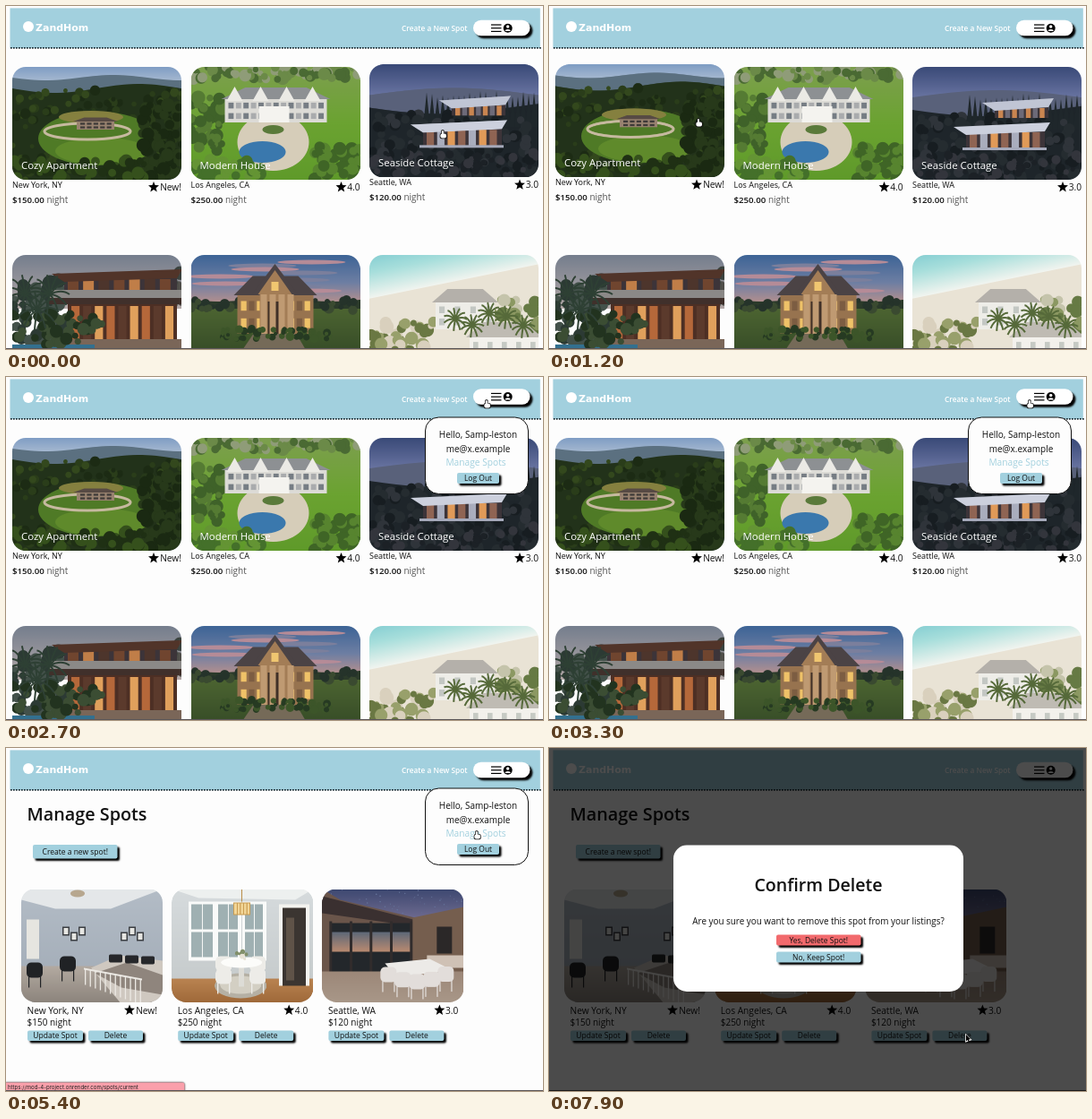
Animation of 600 by 383 pixels, one loop 8 s. Source, as an HTML page with a canvas:

```html
<!DOCTYPE html>
<html lang="en">
<head>
<meta charset="utf-8">
<title>Rental spots</title>
<style>
html, body { margin: 0; width: 100%; height: 100%; overflow: hidden; background: #fdfdfd; }
canvas { display: block; width: 600px; height: 383px; }
</style>
</head>
<body>
<canvas id="stage" width="600" height="383"></canvas>
<script>
const W = 600, H = 383, LOOP = 8000;
const BLUE = '#a2d0de', INK = '#111';
const screen = document.getElementById('stage').getContext('2d');
let g = screen;

// ---- drawing helpers ----
let seed = 7;
const rnd = () => (seed = (seed * 16807) % 2147483647) / 2147483647;

function rect(c, x, y, w, h) { g.fillStyle = c; g.fillRect(x, y, w, h); }
function round(c, x, y, w, h, r) {
  g.beginPath(); g.roundRect(x, y, w, h, r); g.fillStyle = c; g.fill();
}
function oval(c, x, y, rx, ry = rx) {
  g.beginPath(); g.ellipse(x, y, rx, ry, 0, 0, 7); g.fillStyle = c; g.fill();
}
function ring(c, w, x, y, rx, ry) {
  g.beginPath(); g.ellipse(x, y, rx, ry, 0, 0, 7);
  g.strokeStyle = c; g.lineWidth = w; g.stroke();
}
function poly(c, ...p) {
  g.beginPath();
  for (let i = 0; i < p.length; i += 2) g.lineTo(p[i], p[i + 1]);
  g.closePath(); g.fillStyle = c; g.fill();
}
function repeat(n, fn) { for (let i = 0; i < n; i++) fn(i); }
function text(s, x, y, size, { weight = 500, color = INK, align = 'left', font = 'Open Sans' } = {}) {
  g.font = `${weight} ${size}px "${font}", sans-serif`;
  g.fillStyle = color; g.textAlign = align;
  g.fillText(s, x, y);
  return g.measureText(s).width;
}
function star(x, y, r) {
  const p = [];
  repeat(10, i => {
    const a = i * Math.PI / 5 - Math.PI / 2, q = i % 2 ? r * 0.43 : r;
    p.push(x + Math.cos(a) * q, y + Math.sin(a) * q);
  });
  poly('#000', ...p);
}
function shadowed(dx, blur, fn) {
  g.save();
  g.shadowColor = '#000'; g.shadowBlur = blur; g.shadowOffsetX = g.shadowOffsetY = dx;
  fn(); g.restore();
}
function button(label, x, y, w, h, color = BLUE) {
  shadowed(2.5, 2, () => round(color, x, y, w, h, 2));
  text(label, x + w / 2, y + h / 2 + 3, 8.5, { align: 'center' });
}

// ---- scenery helpers ----
function fade(y, h, ...cols) {
  const f = g.createLinearGradient(0, y, 0, y + h);
  cols.forEach((c, i) => f.addColorStop(i / (cols.length - 1), c));
  rect(f, -20, y, 240, h);
}
function hills(c, y, amp, wave) {
  g.beginPath(); g.moveTo(0, 126);
  for (let x = 0; x <= 190; x += 5) g.lineTo(x, y + amp * Math.sin(x / wave));
  g.lineTo(190, 126); g.fillStyle = c; g.fill();
}
function leaves(n, x, y, w, h, r, ...cols) {
  repeat(n, i => oval(cols[i % cols.length], x + rnd() * w, y + rnd() * h, r * (0.4 + rnd() * 0.6)));
}
function panes(n, x, y, w, h, ...cols) {
  repeat(n, i => rect(cols[i % cols.length], x + w * i / n, y, w / n * 0.7, h));
}
function house(x, y, w, h, wall, roof, ...lights) {
  rect(wall, x, y, w, h);
  poly(roof, x - 4, y, x + w * 0.2, y - h * 0.5, x + w * 0.8, y - h * 0.5, x + w + 4, y);
  repeat(2, i => panes(Math.round(w / 9), x + 4, y + h * (0.15 + i * 0.45), w - 5, h * 0.25, ...lights));
}
function slab(x, y, w, h, roof, ...lights) {
  rect('#3c3439', x, y, w, h);
  panes(7, x + 4, y + 3, w - 6, h - 3, ...lights);
  poly(roof, x - 14, y - 3, x + w + 6, y - 8, x + w, y + 2, x, y + 6);
}
function palm(x, y, r, c) {
  g.strokeStyle = c; g.lineWidth = 2;
  repeat(11, i => {
    const dx = Math.cos(i * 0.57) * r, dy = Math.sin(i * 0.57) * r;
    g.beginPath(); g.moveTo(x, y);
    g.quadraticCurveTo(x + dx * 0.6, y + dy * 0.6 - r * 0.3, x + dx, y + dy);
    g.stroke();
  });
}
function chair(c, x, y) {
  round(c, x - 9, y - 9, 18, 17, 5);
  [-7, 6].forEach(d => rect(c, x + d, y + 6, 1.2, 13));
}
function photo(w, h, paint) {
  const c = document.createElement('canvas'), k = 2;
  c.width = w * k; c.height = h * k;
  g = c.getContext('2d'); g.scale(k, k);
  g.beginPath(); g.roundRect(0, 0, w, h, 15); g.clip();
  paint(); g = screen;
  return { c, w, h };
}
const outside = paint => photo(189, 126, paint);
const room = paint => photo(158, 126, paint);
const show = (p, x, y) => g.drawImage(p.c, x, y, p.w, p.h);

// ---- photos ----
const valley = outside(() => {
  fade(0, 30, '#7f9dc4', '#c9d2dc');
  hills('#5b7080', 12, 3, 24);
  hills('#22321a', 24, 5, 30);
  leaves(200, 0, 26, 189, 100, 6, '#1c2b14', '#2a3d1a', '#33481d');
  oval('#4f7a26', 95, 80, 66, 30);
  oval('#5f8a2b', 100, 94, 52, 15);
  oval('#85803f', 88, 56, 36, 7);
  ring('#c6b99f', 3, 84, 72, 48, 9);
  house(72, 61, 42, 9, '#98826f', '#574a44', '#3e3a38');
  leaves(80, 145, 40, 44, 86, 8, '#1a2912', '#27391a');
  leaves(50, 0, 104, 150, 22, 8, '#1f3014', '#35501c');
});

const mansion = outside(() => {
  fade(0, 126, '#7d9f4e', '#6ba331', '#5f9a2a');
  leaves(70, 0, 0, 189, 14, 7, '#4a6a33', '#6b8a48', '#8f9c78');
  leaves(45, 0, 34, 36, 60, 8, '#3f6229', '#557b33');
  oval('#d6cdb9', 92, 84, 40, 32);
  house(38, 36, 114, 26, '#dcdbd6', '#8d9093', '#767d84', '#a9abad');
  repeat(4, i => poly('#ebeae5', 40 + i * 29, 38, 49 + i * 29, 22, 58 + i * 29, 38));
  rect('#f4f3ef', 76, 44, 34, 18);
  oval('#5a7a3a', 92, 70, 12, 5);
  oval('#3a78ad', 80, 95, 26, 12);
  leaves(50, 138, 88, 51, 38, 8, '#3f6526', '#57842f');
  leaves(40, 0, 104, 80, 22, 8, '#44702a', '#649434');
});

const cottage = outside(() => {
  fade(0, 70, '#3a4a78', '#6a75a2', '#a79fba');
  hills('#59617a', 34, 8, -60);
  hills('#1e252a', 48, 7, 50);
  repeat(22, i => poly('#1f272b', 60 + i * 6, 70, 64 + i * 6, 28 + 10 * rnd(), 68 + i * 6, 70));
  leaves(130, 0, 56, 189, 70, 7, '#171d21', '#252c30', '#2f343a');
  slab(92, 43, 60, 14, '#c0c5d4', '#c98550', '#6d6a78');
  slab(60, 70, 88, 20, '#ccd0dd', '#8f6453', '#a9adbd', '#e09a58');
  rect('#a5a9ba', 56, 90, 94, 3);
  leaves(60, 0, 98, 189, 28, 6, '#1c2126', '#33353c');
});

const villa = outside(() => {
  fade(0, 60, '#757e8d', '#b4a9a8');
  leaves(60, 0, 26, 60, 70, 9, '#2c3a34', '#43514a');
  leaves(20, 160, 20, 30, 40, 8, '#3a423e', '#504f4a');
  slab(58, 24, 126, 20, '#513429', '#70452f', '#c07e48', '#4d352c');
  rect('#8b8987', 42, 39, 147, 9);
  rect('#40302b', 40, 48, 149, 7);
  rect('#4d2f24', 62, 55, 122, 42);
  panes(9, 66, 57, 118, 38, '#b5683a', '#5b3a2c', '#e0a05c');
  rect('#7a6658', 44, 94, 145, 32);
  rect('#33708f', 0, 100, 92, 26);
  leaves(50, 0, 66, 100, 34, 8, '#22331f', '#3b4d33');
  repeat(3, i => palm(14 + i * 14, 44 + (i % 2) * 18, 22, '#2e4034'));
});

const manor = outside(() => {
  fade(0, 62, '#3d6496', '#6e7fa3', '#d09686');
  repeat(9, i => oval(i % 2 ? '#7b7f9c' : '#b58b97', rnd() * 189, 8 + i * 4, 38, 2.5));
  hills('#2b3a2a', 50, 2, 20);
  fade(60, 66, '#4c6431', '#2f4424');
  leaves(60, 0, 50, 189, 12, 6, '#25332a', '#3a4a30');
  poly('#756a58', 70, 88, 118, 88, 140, 126, 44, 126);
  house(52, 45, 85, 43, '#97734f', '#4b4345', '#efc268', '#7c5d42');
  poly('#4b4345', 68, 44, 94, 10, 120, 44);
  poly('#a37d56', 75, 44, 94, 17, 113, 44);
  rect('#a37d56', 77, 43, 35, 45);
  rect('#f0c670', 90, 30, 8, 10);
  rect('#403027', 86, 52, 18, 36);
  panes(4, 78, 44, 40, 44, '#bf9a72');
  leaves(60, 34, 82, 122, 12, 5, '#263a22', '#3c5529');
});

const beach = outside(() => {
  rect('#e9e3d5', 0, 0, 189, 126);
  g.save();
  g.translate(0, 12); g.rotate(-0.2);
  fade(-20, 56, '#78c8cf', '#a8dfdc', '#f2f5f0');
  g.restore();
  leaves(70, 0, 74, 75, 52, 8, '#6a7843', '#98a06b', '#d9d0bd');
  leaves(50, 130, 50, 59, 50, 8, '#667a44', '#8b9862', '#c5c4ab');
  house(74, 53, 66, 30, '#eeede8', '#b4b0aa', '#c3c7c3', '#eeede8');
  house(112, 92, 77, 34, '#f3f1ec', '#bfbbb3', '#c6cac4', '#f3f1ec');
  repeat(5, i => palm(96 + i * 19, 72 + 8 * Math.sin(i * 2), 13, '#566a3a'));
});

const bedroom = room(() => {
  fade(0, 126, '#b3bcc6', '#a0aab5');
  poly('#e4e7e9', 0, 0, 158, 0, 100, 22, 38, 22, 0, 12);
  oval('#b7a78f', 63, 5, 8, 4);
  rect('#e6e5e0', 6, 34, 14, 44);
  fade(86, 40, '#b3aaa1', '#8d857d');
  repeat(6, i => {
    const x = 46 + i * 9 + (i > 2 ? 38 : 0), y = 42 + (i % 2) * 6;
    rect('#3b3e42', x, y, 8, 10); rect('#e6e6e2', x + 1.5, y + 1.5, 5, 7);
  });
  poly('#cfc8c0', 78, 88, 110, 74, 158, 80, 158, 126, 110, 126);
  poly('#8f857d', 82, 94, 118, 82, 158, 96, 158, 118, 112, 110);
  repeat(3, i => round('#26272a', 98 + i * 18, 73 + i, 15, 9, 2));
  repeat(12, i => rect('#ece9e4', 71 + i * 5.6, 89 + i, 1.3, 18 + i));
  poly('#ece9e4', 70, 88, 135, 100, 135, 102, 70, 90);
  [15, 52].forEach((x, i) => chair('#202225', x, 91 - i * 7));
});

const dining = room(() => {
  fade(0, 126, '#d6dbdd', '#c3c8c9');
  poly('#edf0ef', 0, 0, 158, 0, 138, 12, 30, 10);
  fade(100, 26, '#b98351', '#a06a3a');
  repeat(3, i => {
    const x = 22 + i * 30, w = 25 - i * 2;
    rect('#f9faf9', x - 3, 14, w + 6, 66);
    repeat(4, k => rect('#9fb0b2', x + (k % 2) * w / 2, 17 + (k >> 1) * 31, w / 2 - 1, 28));
  });
  rect('#f3f3ef', 120, 17, 34, 91);
  rect('#3b3531', 124, 21, 26, 87);
  rect('#5f5348', 128, 32, 9, 70);
  rect('#b88a42', 77.5, 0, 1, 14);
  rect('#c99c51', 69, 15, 19, 14);
  panes(5, 70, 16, 18, 12, '#f2d698');
  oval('#b5b0a4', 77, 108, 29, 14);
  oval('#d3cfc3', 77, 107, 23, 10);
  repeat(4, i => chair('#edece8', 58 + (i % 2) * 38, 84 + (i >> 1) * 14));
  rect('#dddcd6', 75, 83, 6, 26);
  oval('#fcfcfa', 78, 82, 23, 6);
  leaves(8, 72, 70, 12, 9, 3, '#82906b', '#e8e3d6');
});

const patio = room(() => {
  fade(0, 45, '#3d4870', '#80779c');
  leaves(60, 0, 0, 158, 30, 0.8, '#65749b');
  poly('#6a554a', 0, 0, 20, 12, 112, 34, 112, 98, 0, 112);
  poly('#3a3030', 0, 8, 113, 37, 113, 43, 0, 27);
  poly('#755e4e', 101, 32, 158, 20, 158, 96, 101, 86);
  rect('#23272b', 8, 38, 91, 54);
  fade(48, 22, '#5d6878', '#b98a70');
  rect('#6a554a', 0, 48, 8, 22);
  rect('#755e4e', 101, 48, 57, 22);
  repeat(5, i => rect('#312c2c', 8 + i * 22.5, 36, 3, 56));
  rect('#2b2828', 128, 42, 17, 30);
  fade(92, 34, '#9c8778', '#a89788');
  rect('#cfc1b5', 117, 74, 41, 14);
  poly('#eceae7', 70, 83, 120, 78, 146, 91, 83, 98);
  repeat(5, i => chair('#e2ddda', 74 + i * 16, 96 + 8 * Math.sin(i * 0.8)));
});

const spots = [
  { title: 'Cozy Apartment', city: 'New York, NY', price: 150, rate: 'New!', out: valley, inside: bedroom, below: villa },
  { title: 'Modern House', city: 'Los Angeles, CA', price: 250, rate: '4.0', out: mansion, inside: dining, below: manor },
  { title: 'Seaside Cottage', city: 'Seattle, WA', price: 120, rate: '3.0', out: cottage, inside: patio, below: beach }
];

// ---- timeline (ms) ----
const OPEN = 2700, LINK = 3950, CLICK = 4250, READY = 4800, LEAVE = 5800, CLOSE = 6200, CONFIRM = 7600;
// Pointer rests: arrive, leave, x, y
const rests = [
  [0, 200, 487, 139], [1050, 1250, 166, 126], [1850, 2050, 525, 33],
  [2250, 3400, 536, 26], [3900, 5700, 525, 93], [6800, LOOP, 466, 320]
];
function pointer(t) {
  const i = rests.findIndex(r => t <= r[1]);
  const [arrive, , x, y] = rests[i];
  if (t >= arrive) return [x, y];
  const [, left, x0, y0] = rests[i - 1];
  const u = (t - left) / (arrive - left), e = u * u * (3 - 2 * u);
  return [x0 + (x - x0) * e, y0 + (y - y0) * e];
}
const cardX = i => 7 + i * 199.5;
const cardBox = i => [cardX(i), 68, 189, 152];
const pill = [522, 15.8, 63.5, 17.5];
const over = (t, [x, y, w, h]) => {
  const [px, py] = pointer(t);
  return px >= x && px <= x + w && py >= y && py <= y + h;
};
// Share of the last 120 ms spent hovering gives a linear transition.
function lift(t, box) {
  let n = 0;
  repeat(6, k => n += over(Math.max(0, t - k * 20), box));
  return -2.6 * n / 6;
}

// ---- page parts ----
function header(t) {
  rect(BLUE, 4.5, 2.4, 592.3, 44.6);
  for (let x = 5; x < 597; x += 3) rect('#182830', x, 46, 1.7, 1.7);
  oval('#fff', 25, 23, 6);
  text('ZandHom', 33, 28, 11, { weight: 700, color: '#fff', font: 'DejaVu Sans' });
  text('Create a New Spot', 515.5, 27.5, 8.3, { weight: 600, color: '#fff', align: 'right' });
  g.save();
  g.translate(0, t < CLICK ? lift(t, pill) : 0);
  shadowed(3, 2, () => round('#fff', ...pill, 9));
  repeat(3, i => rect('#000', 542, 20.4 + i * 3.7, 11.5, 1.2));
  oval('#000', 560.7, 24.7, 5);
  oval('#fff', 560.7, 23, 1.7);
  g.beginPath(); g.ellipse(560.7, 28, 3, 2.1, 0, Math.PI, 0); g.fill();
  g.restore();
}
function rating(s, x, y, size) {
  const w = text(s, x, y, size, { align: 'right' });
  star(x - Math.round(w) - 7, y - 3.7, 6.3);
}
function home(t) {
  spots.forEach((s, i) => {
    const x = cardX(i);
    show(s.below, x, 278);
    g.save();
    g.translate(x, lift(t, cardBox(i)));
    show(s.out, 0, 68);
    text(s.title, 10, 182, 11.4, { color: '#fff' });
    text(s.city, 0, 203, 9);
    rating(s.rate, 189, 206, 10.2);
    const w = text(`$${s.price}.00`, 0, 219.5, 9.7, { weight: 600 });
    text('night', w + 2.6, 219.5, 10, { color: '#555' });
    g.restore();
  });
}
function manage() {
  text('Manage Spots', 23.5, 81, 19.8, { weight: 600 });
  button('Create a new spot!', 30, 108, 94.5, 15.5);
  spots.forEach((s, i) => {
    g.save();
    g.translate(17 + i * 168.2, 0);
    show(s.inside, 0, 157.5);
    text(s.city, 6.5, 296.5, 10.2);
    rating(s.rate, 152, 296.5, 10.2);
    text(`$${s.price} night`, 6.5, 310, 10);
    button('Update Spot', 7, 315.5, 62, 11.5);
    button('Delete', 75, 315.5, 61, 11.5);
    g.restore();
  });
}
function menu() {
  round('#fdfdfd', 468.5, 45, 115, 85.5, 15);
  g.strokeStyle = INK; g.lineWidth = 1; g.stroke();
  text('Hello, Samp-leston', 527.5, 67.5, 10, { align: 'center' });
  text('me@x.example', 527.5, 84, 10, { align: 'center' });
  text('Manage Spots', 525, 98.5, 10.2, { align: 'center', color: BLUE });
  button('Log Out', 504, 107, 47, 12);
}
function status(label) {
  shadowed(0, 2, () => round('#faa0ab', -2, 373.5, 201.5, 12, 2.5));
  text(label, 2, 380.5, 6.1, { weight: 400, color: '#222', font: 'Inter' });
}
function confirmBox() {
  rect('rgba(0,0,0,0.7)', 0, 0, W, H);
  round('#fff', 139, 108.5, 324, 163.5, 15);
  text('Confirm Delete', 301, 160, 19.6, { weight: 600, align: 'center' });
  text('Are you sure you want to remove this spot from your listings?', 301, 196.5, 9.9, { align: 'center' });
  button('Yes, Delete Spot!', 254, 208.5, 94.5, 12, '#f26a6d');
  button('No, Keep Spot!', 254, 227.5, 94.5, 12);
}
function hand() {
  [[INK, 0.7], ['#fff', 0]].forEach(([c, d]) => {
    round(c, -d, -d, 1.8 + 2 * d, 6 + 2 * d, 1);
    round(c, -1.6 - d, 3.6 - d, 6.6 + 2 * d, 5 + 2 * d, 2);
  });
}
function arrow() {
  shadowed(0, 1.5, () => poly('#fff', -0.8, -1.6, -0.8, 8.8, 6.6, 6));
  poly('#000', 0, 0, 0, 7.4, 1.7, 5.9, 2.9, 8.6, 4.1, 8.1, 2.9, 5.4, 5.2, 5.3);
}
function cursor(t) {
  const hot = [pill, [491, 90, 68, 10], [428, 315, 61, 12]];
  if (t < CLICK) hot.push(...spots.map((s, i) => cardBox(i)));
  g.save();
  g.translate(...pointer(t));
  if (t < CONFIRM && hot.some(b => over(t, b))) hand(); else arrow();
  g.restore();
}

function draw(t) {
  rect('#fdfdfd', 0, 0, W, H);
  if (t < CLICK) home(t);
  else if (t < READY) text('Loading...', 4, 57.5, 10);
  else manage();
  header(t);
  if (t >= OPEN && t < CLOSE) menu();
  if (t >= LINK && t < LEAVE) {
    const waiting = t >= CLICK && t < READY;
    status(waiting ? 'Waiting for cache…' : 'https://mod-4-project.onrender.com/spots/current');
  }
  rect('#5a5557', 0, 382, W, 1);
  if (t >= CONFIRM) confirmBox();
  cursor(t);
}

const start = performance.now();
function tick() {
  draw((performance.now() - start) % LOOP);
  requestAnimationFrame(tick);
}
tick();
</script>
</body>
</html>
```
